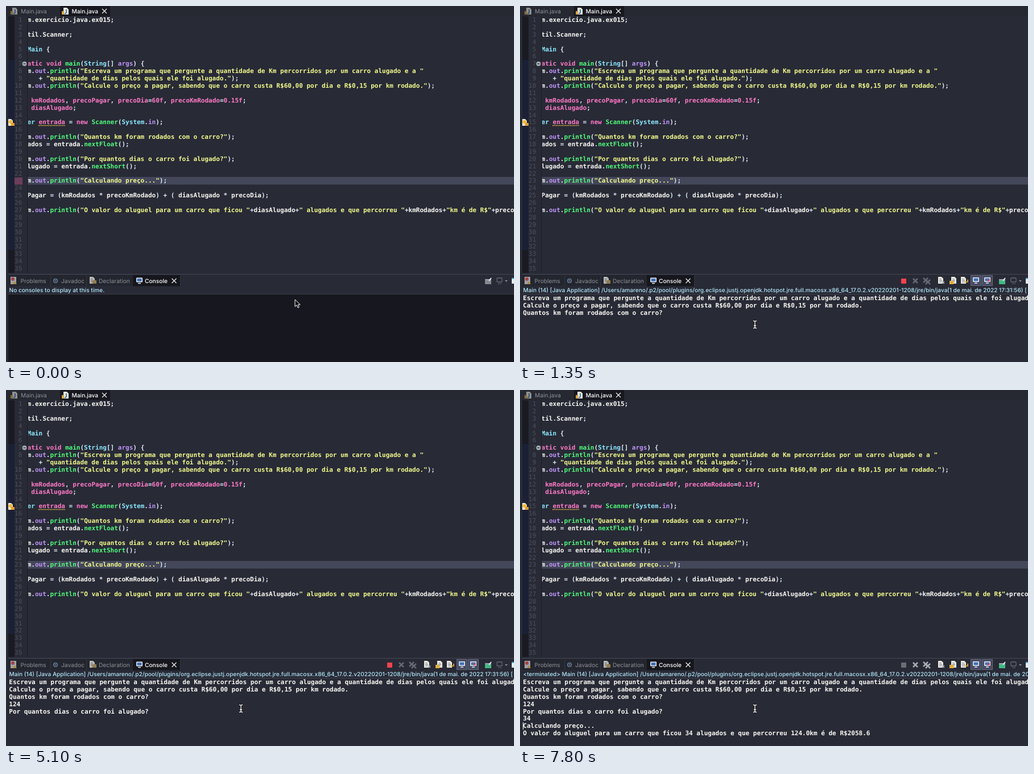
Animation, 893 px wide and 627 px high, one loop 8000 ms. Source, as an HTML page:

```html
<!DOCTYPE html>
<html lang="pt">
<head>
<meta charset="utf-8">
<title>Console</title>
<style>
html, body { margin: 0; width: 100%; height: 100%; overflow: hidden; background: #282a36; }
svg { display: block; width: 893px; height: 627px; }
text { white-space: pre; text-rendering: geometricPrecision; }
.mono { font: bold 11.025px "DejaVu Sans Mono", monospace; fill: #f8f8f2; }
.num { font-weight: normal; fill: #4d4f5d; text-anchor: end; }
.ui { font: 10.2px Inter, sans-serif; fill: #8e9099; }
.ui.on { font-weight: 500; fill: #fff; }
.head { font: 500 10.1px Inter, sans-serif; fill: #b4e9fb; }
.str { fill: #f1fa8c; }
.key { fill: #ff79c6; }
.fn { fill: #50fa7b; }
.type { fill: #8be9fd; }
.field { fill: #bd93f9; }
.op { fill: #dcecf8; }
</style>
</head>
<body>
<svg viewBox="0 0 893 627">
  <defs>
    <clipPath id="codeClip"><rect x="39" y="18" width="854" height="452"/></clipPath>
    <g id="java">
      <path d="M3 0h6l3 3v9H3z" fill="#e9e6da"/>
      <path d="M8 3v5q0 2.500-3 2.200" fill="none" stroke="#3d6fb4" stroke-width="1.800"/>
      <rect y="6" width="4" height="6" fill="#d9a441"/>
    </g>
    <g id="page">
      <path d="M0 0h6l3 3v9H0z" fill="#eceae0"/>
      <path d="M2 4h4M2 6.500h5M2 9h4" stroke="#6c7894"/>
    </g>
    <g id="screen">
      <rect width="11" height="8" rx="1" fill="#e6edf8"/>
      <rect x="1.500" y="1.500" width="8" height="5" fill="#3f70b5"/>
      <path d="M3 10h5" stroke="#e6edf8" stroke-width="1.500"/>
    </g>
    <path id="cross" d="M0 0L8 8M8 0L0 8"/>
    <path id="ibeam" d="M-3-6.500q3 0 3 2v9q0 2-3 2M3-6.500q-3 0-3 2v9q0 2 3 2M-2 2h4"/>
  </defs>

  <rect width="893" height="627" fill="#282a36"/>

  <!-- editor tabs -->
  <rect width="893" height="18" fill="#262832"/>
  <rect x="95" width="88" height="18" fill="#17181f"/>
  <use href="#java" x="8" y="3" opacity=".55"/>
  <text class="ui" x="26" y="12.700">Main.java</text>
  <use href="#java" x="98" y="3"/>
  <text class="ui on" x="115.500" y="12.700">Main.java</text>
  <use href="#cross" x="169" y="5" stroke="#eee" stroke-width="1.300"/>

  <!-- rulers -->
  <rect x="4" y="18" width="11" height="452" fill="#191a22"/>
  <rect x="4" y="95" width="11" height="335" fill="#1b2036"/>
  <rect x="37" y="18" width="1" height="452" fill="#1c1d26"/>
  <rect x="38" y="301" width="855" height="13.500" fill="#44475a"/>
  <rect id="mark" x="15" y="302" width="14" height="12.500" fill="#743a5a"/>
  <g id="numbers"></g>
  <circle cx="32.500" cy="101.700" r="4" fill="#a9abb2"/>
  <path d="M30.500 101.700h4" stroke="#282a36" stroke-width="1.200"/>
  <path d="M4 199h5l3 3v9H4z" fill="#ece6cf"/>
  <circle cx="8" cy="204" r="3" fill="#f2b632"/>
  <rect x="9" y="206" width="6" height="5" fill="#e39a2d"/>
  <g id="code" clip-path="url(#codeClip)"></g>
  <path d="M57 210.500H104" stroke="#f0c34a" stroke-width="1.300" stroke-dasharray="1.500 1"/>

  <!-- panel tabs -->
  <path d="M4 472.500H893" stroke="#454752"/>
  <rect x="4" y="474" width="302" height="19" fill="#24262f"/>
  <rect x="223" y="474" width="83" height="19.500" fill="#16171d"/>
  <path d="M78.500 475v18M141.500 475v18M306.500 474v19" stroke="#353742"/>
  <g opacity=".75">
    <rect x="8" y="477" width="10" height="13" fill="#c9cbd2"/>
    <circle cx="12" cy="481" r="3" fill="#cf4a4a"/>
    <path d="M15 485l4 5h-7z" fill="#e0ab3d"/>
    <circle cx="87" cy="484" r="3.300" fill="none" stroke="#7f9fca" stroke-width="1.500"/>
    <circle cx="87" cy="484" r="1.200" fill="#7f9fca"/>
    <use href="#page" x="147" y="477"/>
    <rect x="152" y="483" width="7" height="6" fill="#b79a5b"/>
  </g>
  <text class="ui" x="25.500" y="487.800">Problems</text>
  <text class="ui" x="97" y="487.800">Javadoc</text>
  <text class="ui" x="163" y="487.800">Declaration</text>
  <use href="#screen" x="229" y="478.500"/>
  <text class="ui on" x="244" y="487.800">Console</text>
  <use href="#cross" x="291.500" y="480" stroke="#eee" stroke-width="1.300"/>

  <!-- toolbar -->
  <g id="tools">
    <rect id="stop" x="670" y="480" width="9" height="9" rx="1"/>
    <g id="crosses" stroke-width="2.500">
      <use href="#cross" x="691" y="480"/>
      <use href="#cross" x="709" y="479"/>
      <use href="#cross" x="713" y="482"/>
    </g>
    <use href="#page" x="735" y="477"/>
    <path d="M742 485l4 4m0-4l-4 4" stroke="#aab0bd" stroke-width="1.300"/>
    <use href="#page" x="758" y="477"/>
    <rect x="755" y="484" width="7" height="6" fill="#e3ae3c"/>
    <use href="#page" x="775" y="477"/>
    <path d="M781 486h6v-4" fill="none" stroke="#e3ae3c" stroke-width="1.700"/>
    <g fill="#474b62" stroke="#666a7c">
      <rect x="792.500" y="474.500" width="18" height="18"/>
      <rect x="812.500" y="474.500" width="18" height="18"/>
    </g>
    <use href="#screen" x="796" y="478"/>
    <use href="#screen" x="816" y="478"/>
    <path d="M822 481l4 4m0-4l-4 4" stroke="#e0484c" stroke-width="1.500"/>
  </g>
  <rect x="842" y="481" width="11" height="9" fill="#b9bdc4" opacity=".8"/>
  <rect id="pin" x="842" y="483" width="11" height="7"/>
  <path d="M849 484l4-5" stroke="#e4e6ea" stroke-width="2"/>
  <rect x="863" y="479" width="9" height="7" rx="1" fill="none" stroke="#666975" stroke-width="1.300"/>
  <path d="M865 489h6" stroke="#666975"/>
  <path d="M877 483h5l-2.500 3z" fill="#8b8e98"/>
  <rect x="889" y="479" width="4" height="10" fill="#e6edf3"/>
  <rect x="889" y="479" width="4" height="2" fill="#5fb4d8"/>

  <!-- console -->
  <rect id="blank" x="4" y="507" width="889" height="120" fill="#17181f"/>
  <path d="M4 507.500H893" stroke="#3c3e4a"/>
  <text class="head" id="idle" x="5.500" y="503.700">No consoles to display at this time.</text>
  <text class="head" id="ended" x="5.500" y="503.700">&lt;terminated&gt;</text>
  <g class="head" id="title">
    <text x="5.500" y="503.700">Main (14) [Java Application]</text>
    <text x="143" y="503.700">/Users/amareno/.p2/pool/plugins/org.eclipse.justj.openjdk.hotspot.jre.full.macosx.x86_64_17.0.2.v20220201-1208/jre/bin/java</text>
    <text x="751" y="503.700">(1 de mai. de 2022 17:31:56) [</text>
  </g>
  <g id="output"></g>
  <rect id="caret" width="1" height="12.900" fill="#fff"/>

  <path id="arrow" d="M508 517v12.500l3-2.800 2 4.800 2.200-1-2-4.500h4z" fill="#111" stroke="#fff"/>
  <g id="beam" fill="none">
    <use href="#ibeam" stroke="#111" stroke-width="3"/>
    <use href="#ibeam" stroke="#fff" stroke-width="1.300"/>
  </g>
</svg>
<script>
const $ = id => document.getElementById(id);
const CHAR = 6.637, ROW = 12.885, LOOP = 8000;

function addText(parent, cls, x, y, text = '') {
  const el = document.createElementNS('http://www.w3.org/2000/svg', 'text');
  el.setAttribute('class', cls);
  el.setAttribute('x', x);
  el.setAttribute('y', y);
  el.textContent = text;
  parent.append(el);
  return el;
}

const code = {
  1: 'm.exercicio.java.ex015;',
  3: 'til.Scanner;',
  5: 'Main {',
  7: 'atic void main(String[] args) {',
  8: 'm.out.println("Escreva um programa que pergunte a quantidade de Km percorridos por um carro alugado e a "',
  9: '   + "quantidade de dias pelos quais ele foi alugado.");',
  10: 'm.out.println("Calcule o preço a pagar, sabendo que o carro custa R$60,00 por dia e R$0,15 por km rodado.");',
  12: ' kmRodados, precoPagar, precoDia=60f, precoKmRodado=0.15f;',
  13: ' diasAlugado;',
  15: 'er entrada = new Scanner(System.in);',
  17: 'm.out.println("Quantos km foram rodados com o carro?");',
  18: 'ados = entrada.nextFloat();',
  20: 'm.out.println("Por quantos dias o carro foi alugado?");',
  21: 'lugado = entrada.nextShort();',
  23: 'm.out.println("Calculando preço...");',
  25: 'Pagar = (kmRodados * precoKmRodado) + ( diasAlugado * precoDia);',
  27: 'm.out.println("O valor do aluguel para um carro que ficou "+diasAlugado+" alugados e que percorreu "+kmRodados+"km é de R$"+precoPagar);'
};

function kind(token, next, line) {
  if (token[0] === '"') return 'str';
  if (/^(atic|void|new)$/.test(token)) return 'key';
  if (/^\w/.test(token)) {
    if (next === '(') return 'fn';
    if (/^(String|System|Main|er)$/.test(token)) return 'type';
    if (/^(out|in|args)$/.test(token)) return 'field';
    if (line === 12 || line === 13 || (line === 15 && token === 'entrada')) return 'key';
    return '';
  }
  return 'op';
}

for (let n = 1; n <= 35; n++) {
  const y = 28 + (n - 1) * ROW;
  addText($('numbers'), 'mono num', 28.3, y, n);
  if (!code[n]) continue;
  const line = addText($('code'), 'mono', 37.6, y);
  const tokens = code[n].match(/"[^"]*"|[\d.]+f|\w+|\s+|[^\w\s"]/g);
  tokens.forEach((token, i) => {
    const span = document.createElementNS('http://www.w3.org/2000/svg', 'tspan');
    span.setAttribute('class', kind(token, tokens[i + 1], n));
    span.textContent = token;
    line.append(span);
  });
}

const intro = [
  'Escreva um programa que pergunte a quantidade de Km percorridos por um carro alugado e a quantidade de dias pelos quais ele foi alugado.',
  'Calcule o preço a pagar, sabendo que o carro custa R$60,00 por dia e R$0,15 por km rodado.',
  'Quantos km foram rodados com o carro?'
];
const days = [...intro, '124', 'Por quantos dias o carro foi alugado?'];
const result = [...days, '34', 'Calculando preço...',
  'O valor do aluguel para um carro que ficou 34 alugados e que percorreu 124.0km é de R$2058.6'];

// [start ms, console lines, caret as [column, row] or null]
const steps = [
  [0, [], null],
  [150, [], [0, 0]],
  [300, intro, [0, 3]],
  [1350, intro, null],
  [1950, intro, [0, 3]],
  [2400, [...intro, '1'], [1, 3]],
  [2550, [...intro, '12'], [2, 3]],
  [2850, [...intro, '124'], [3, 3]],
  [3000, [...intro, '124'], null],
  [3300, [...intro, '124'], [0, 4]],
  [3450, days, [0, 4]],
  [3900, days, null],
  [4500, days, [0, 4]],
  [5100, days, null],
  [5400, [...days, '4'], [1, 5]],
  [5700, [...days, '4'], null],
  [6150, [...days, '4'], [1, 5]],
  [6600, days, [0, 5]],
  [6750, days, null],
  [7200, [...days, '3'], [1, 5]],
  [7350, [...days, '34'], null],
  [7650, [...days, '34'], [0, 6]],
  [7800, result, [0, 6]]
];

// [start ms, x, y] of the text pointer
const pointer = [[450, 497, 531], [600, 455, 550], [750, 420, 560], [900, 413, 561]];

const rows = result.map((_, i) => addText($('output'), 'mono', 5.3, 518 + i * ROW));
const show = (id, on) => $(id).setAttribute('display', on ? 'inline' : 'none');
const at = (list, t) => list.findLast(item => item[0] <= t);
let last;

function draw(now) {
  const t = now % LOOP;
  const tick = Math.floor(t / 150);
  if (tick !== last) {
    last = tick;
    const [, lines, caret] = at(steps, t);
    const running = t >= 150, ended = t >= 7800;
    rows.forEach((row, i) => { row.textContent = lines[i] || ''; });

    show('caret', caret);
    if (caret) {
      $('caret').setAttribute('x', 5 + Math.round(caret[0] * CHAR));
      $('caret').setAttribute('y', 508 + caret[1] * ROW);
    }

    show('blank', !running);
    show('idle', !running);
    show('tools', running);
    show('title', running);
    show('ended', ended);
    show('mark', t < 300);
    $('title').setAttribute('transform', `translate(${ended ? 68 : 0} 0)`);
    $('stop').setAttribute('fill', ended ? '#6b6d76' : '#f5424e');
    $('crosses').setAttribute('stroke', ended ? '#a9abb2' : '#666873');
    $('pin').setAttribute('fill', running ? '#43b883' : '#85888f');

    const pos = at(pointer, t);
    show('arrow', !pos);
    show('beam', pos);
    if (pos) $('beam').setAttribute('transform', `translate(${pos[1]} ${pos[2]})`);
  }
  requestAnimationFrame(draw);
}
draw(performance.now());
</script>
</body>
</html>
```
